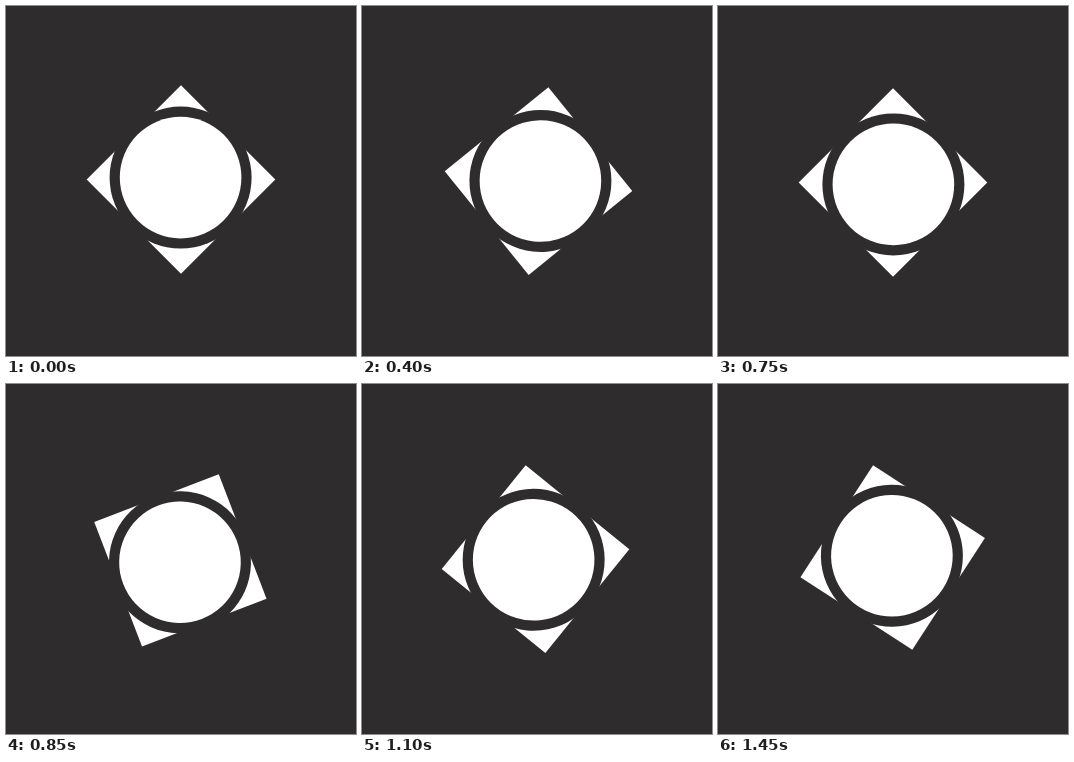
These frames come from a looping animation (350 px wide and 350 px high, 1.5 s). An HTML page:

```html
<!DOCTYPE html>
<html lang="en">
<head>
<meta charset="utf-8">
<title>Spinning sun</title>
<style>
  html, body { margin: 0; width: 100%; height: 100%; overflow: hidden; background: #2e2c2d; }
  svg { display: block; width: 100vw; height: 100vh; }
</style>
</head>
<body>
<svg viewBox="0 0 350 350">
  <rect width="350" height="350" fill="#2e2c2d"/>
  <g id="sun">
    <path d="M0 -95.8L94.3 -1.5L0 92.8L-94.3 -1.5Z" fill="#fff"/>
    <circle cx="-0.4" cy="-3.4" r="71" fill="#2e2c2d"/>
    <circle cx="-0.4" cy="-3.4" r="60.8" fill="#fff"/>
  </g>
</svg>
<script>
  const LOOP = 1500, STEP = 50;
  const sun = document.getElementById('sun');
  const start = performance.now();

  // One clockwise turn per loop, advancing in 50 ms ticks.
  function draw(ms) {
    const tick = Math.floor((ms % LOOP) / STEP);
    const angle = tick * STEP / LOOP * 360;
    sun.setAttribute('transform', `translate(175 175) rotate(${angle})`);
  }

  function loop() {
    draw(Math.max(0, performance.now() - start));
    requestAnimationFrame(loop);
  }

  draw(0);
  requestAnimationFrame(loop);
</script>
</body>
</html>
```
